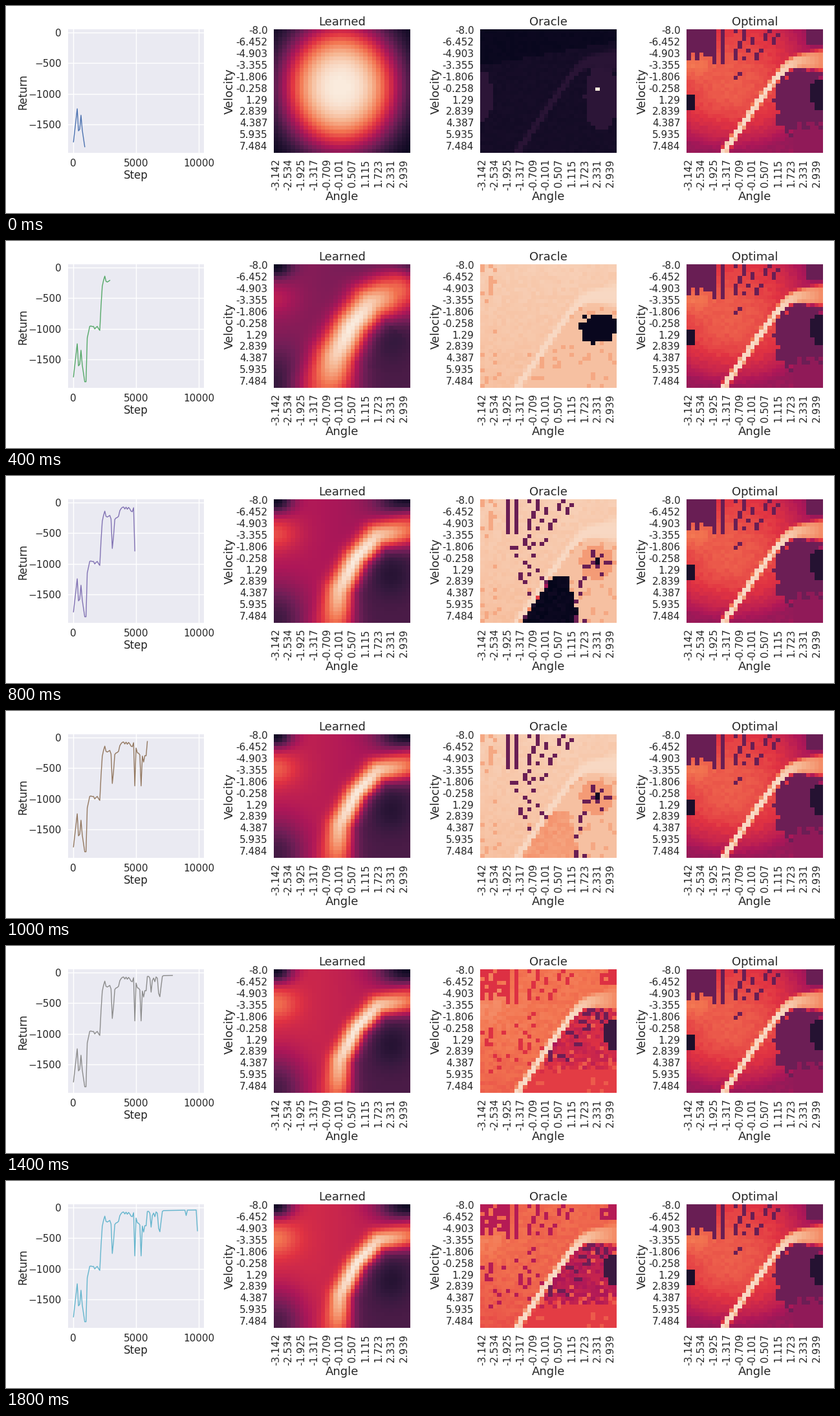
Recreate the animation shown at these times as a matplotlib script. Size 1280 by 320 pixels, loop 2000 ms.

```python
import numpy as np
import matplotlib.pyplot as plt
from matplotlib.animation import FuncAnimation
from matplotlib.colors import LinearSegmentedColormap

W, H, N, RUNS = 1280, 320, 32, 10
TOP, BOTTOM, PANEL_W = 35.8, 226.6, 210.6
INK = "#262626"
CYCLE = ["#4C72B0", "#DD8452", "#55A868", "#C44E52", "#8172B3",
         "#937860", "#DA8BC3", "#8C8C8C", "#CCB974", "#64B5CD"]
ROCKET = LinearSegmentedColormap.from_list("heat", [
    "#03051a", "#35193e", "#701f57", "#ad1759",
    "#e13342", "#f37651", "#f6b48f", "#faebdd"])
plt.rcParams["font.family"] = "DejaVu Sans"

rng = np.random.default_rng(4)
v, u = np.mgrid[0:N, 0:N].astype(float)
noise = rng.random((N, N))
grain = rng.random((N, N)) - 0.5


def training_returns():
    """Plateaus through key points, with jitter and a few collapses."""
    i = np.arange(10 * RUNS)
    keys = [(0, -1785), (3, -1245), (4, -1605), (5, -1580), (6, -1350),
            (7, -1590), (9, -1865), (10, -1865), (11, -1150), (13, -960),
            (21, -1000), (23, -310), (25, -120), (26, -260), (36, -240),
            (37, -70), (49, -80), (51, -245), (58, -250), (59, -60),
            (70, -75), (72, -50), (99, -40)]
    level = np.interp(i, *zip(*keys))
    jitter = rng.uniform(-1, 1, i.size)
    level += np.where((i > 13) & (i < 37), 45 * jitter, 0)
    level -= np.where((i >= 37) & (i < 70), 90 * jitter ** 2, 0)
    for step, value in [(31, -750), (32, -550), (49, -790), (54, -790),
                        (56, -400), (62, -320), (68, -340), (69, -395),
                        (70, -220), (90, -130), (99, -380)]:
        level[step] = value
    return level


def bump(col, row, rx, ry):
    return np.exp(-((u - col) / rx) ** 2 - ((v - row) / ry) ** 2)


def inside(col, row, rx, ry, rough=0.0):
    return np.hypot((u - col) / rx, (v - row) / ry) + rough * grain < 1


def nearest(cols, rows):
    """Distance to a path and the index of its closest point."""
    dist = np.hypot(u[..., None] - cols, v[..., None] - rows)
    return dist.min(axis=2), dist.argmin(axis=2)


def learned(run):
    """A blob that narrows into a bent crest between warm and cold sides."""
    if run == 0:
        return np.exp(-np.hypot((u - 15.2) / 13.8, (v - 14.4) / 16.8) ** 2.9)
    bend = 1 - .4 ** (run - 1)
    first = np.array([(9, 31), (12.5, 24), (16, 16.5), (19.5, 10.5), (23, 5)])
    last = np.array([(14.3, 31), (15, 23), (19, 14.5), (24, 8.7), (31.5, 7.5)])
    keys = first + (last - first) * bend
    t = np.linspace(0, 1, 200)
    cols, rows = (np.interp(t, np.linspace(0, 1, 5), axis) for axis in keys.T)
    dist, k = nearest(cols, rows)

    below = v > np.interp(u, cols, rows)
    side = np.where(below, dist, -dist)
    warm = .28 + .3 * (1 - .7 ** (run - 1)) - .004 * u
    warm += .16 * bend * bump(0, 8.5, 5, 4)
    cold = .2 - .1 * bend * bump(27, 19, 5, 6)
    z = cold + (warm - cold) / (1 + np.exp((side - 2.5) / 1.3))
    z -= .9 * z * (bump(0, 0, 4, 3) + bump(31, 0, 7, 3.5))
    z -= .65 * z * bump(0, 31, 7, 10)

    value = 1 - .3 * np.abs(2 * t - 1) ** 2
    width = (2.1 + 4.2 * .55 ** (run - 1)) * (1 + .5 * (2 * t - 1) ** 2)
    return z + (value[k] - z) * np.exp(-(dist / width[k]) ** 2)


# Shared landmarks of the Oracle and Optimal panels
def crest_row(col):
    return 7.5 + 2.2 * np.log1p(np.exp((23.3 - col) / 1.4))


CREST_U = np.linspace(8.3, 31.5, 200)
tail = np.maximum(CREST_U - 21, 0)
crest_dist, crest_k = nearest(CREST_U, crest_row(CREST_U))
crest_value = (.96 - .019 * tail)[crest_k]
crest_mask = np.exp(-(crest_dist / (.8 + .2 * tail)[crest_k]) ** 6)
lower = (u > 8) & (v > crest_row(u) + .8)
near_crest = lower & (crest_dist < 6)
leaning = (u + .4 * v - 13) % 2.6 < .9
streaks = leaning & (u > 10) & (u + v < 24) & (noise < .8)
streaks |= ((u == 6) | (u == 8)) & (v < 9)
corners = ((u < 6.5) & (v < 4.5 + 3 * noise)) | ((u > 27.5) & (v < 4))
dark_edge = inside(31, 16.5, 2.6, 4, .3)
hole = np.hypot(u - 27.2, v - 16.2) + 1.6 * grain < 4
hole |= (u > 27) & (abs(v - 15.5) < 1.6)


def with_crest(z, value=crest_value):
    return z + (value - z) * crest_mask


def optimal():
    fall = np.where(v > 14, .0009, .0004) * (v - 14) ** 2
    z = np.maximum(.66 - .0006 * (u - 10) ** 2 - fall, .38)
    z += .12 * bump(0, 8, 5, 4) + .03 * grain
    z[streaks | corners] = .27
    z[inside(27, 18.5, 7, 9.5, .3) & lower] = .28
    z[lower & (u > 24) & (v > 23 + 3 * noise)] = .36
    z[dark_edge] = .1
    z[(u < 1 + noise) & (abs(v - 18.5) < 1.6)] = .07
    return with_crest(z)


def early():
    z = .055 - .03 * (v < 9 - .2 * u) + .012 * grain
    z[inside(28, 17, 4, 8.5, .1) | inside(0, 17, 2.6, 6.5, .1)] = .12
    z = with_crest(z, .11)
    z[15, 27] = 1
    return z


def striped():
    z = .51 + .03 * np.sin(.9 * (u + .35 * v)) + .02 * grain
    stripe = np.sin(.9 * (1.5 * u + v)) + 2.2 * grain
    left = (v > 8 + .95 * u) & (u < 11)
    right = (u > 13) & (v > 18 + .2 * abs(u - 16))
    wedge = abs(u - 10.5 - .25 * (31 - v)) < 1.8
    z[(left | right) & ~wedge & (stripe > -.3)] = .03
    z[inside(27.5, 16, 6.6, 5.8, .15)] = .02
    z[16, 19] = .98
    return z


def peach(cone=None, marks=False):
    z = .92 - .001 * v + .02 * grain
    z[lower] = .89
    z[(noise > .88) & ((v > 22) | (u < 4) | lower)] = .83
    if cone is not None:
        wedge = lower & (v > 19) & (u < 20.3 + .27 * (v - 21))
        z[wedge] = cone + .04 * grain[wedge]
    z = with_crest(z, .95)
    if marks:
        z[inside(27, 16, 4, 4.5, .2)] = .8
        dots = (noise < .13) & (abs(v - 16) < 10) & (abs(u - 11) < 5) & ~lower
        ring = (noise > .7) & inside(27, 16, 3.5, 3.5)
        fringe = (noise < .25) & (abs(u - 22.5) < 2) & (v > 19)
        z[streaks | dots | ring | fringe] = .27
        z[15:17, 27] = .04
    else:
        z[hole] = .02
    return z


def fiery(base, mark, under):
    z = base + .05 * bump(0, 8, 8, 6) - .003 * np.maximum(v - 18, 0) + .04 * grain
    z[corners & (noise > .35)] = mark
    dashes = (noise < .16) & (abs(v - 20) < 7) & (u < 15)
    z[streaks | dashes] = mark
    z[lower] = under + .08 * grain[lower]
    z[near_crest & (noise < .25)] = .28
    z[lower & (v > 23 + 4 * noise)] = .59
    z[lower & (noise > .93)] = .66
    z[dark_edge] = .16
    return with_crest(z)


learned_fields = [learned(run) for run in range(RUNS)]
oracle_fields = [
    early(), striped(), peach(), peach(cone=.85),
    peach(cone=.02, marks=True), peach(cone=.8, marks=True), peach(cone=.77),
    fiery(.71, .56, .52), fiery(.7, .5, .5), fiery(.68, .45, .46)]
returns = training_returns()

# Stage
fig = plt.figure(figsize=(W / 100, H / 100), dpi=100, facecolor="white")


def panel(left):
    ax = fig.add_axes([left / W, 1 - BOTTOM / H, PANEL_W / W, (BOTTOM - TOP) / H])
    for spine in ax.spines.values():
        spine.set_visible(False)
    ax.tick_params(length=0, pad=7, labelsize=11, labelcolor=INK)
    return ax


def label(x, y, text, size, upright=False):
    fig.text(x / W, 1 - y / H, text, size=size, color=INK,
             rotation=90 if upright else 0, rotation_mode="anchor",
             ha="center", va="baseline")


def heatmap(left, title, field):
    ax = panel(left)
    image = ax.imshow(field, cmap=ROCKET, vmin=0, vmax=1,
                      aspect="auto", interpolation="nearest")
    ticks = range(0, N, 3)
    angles, speeds = np.linspace(-np.pi, np.pi, N), np.linspace(-8, 8, N)
    ax.set_xticks(ticks, [str(round(float(angles[i]), 3)) for i in ticks], rotation=90)
    ax.set_yticks(ticks, [str(round(float(speeds[i]), 3)) for i in ticks], va="center")
    middle = left + PANEL_W / 2
    label(middle, 30, title, 13)
    label(middle, 300, "Angle", 13)
    label(left - 63, 132, "Velocity", 13, upright=True)
    return image


chart = panel(95.6)
chart.set_facecolor("#EAEAF2")
chart.grid(color="white", linewidth=1)
chart.set_axisbelow(True)
chart.set(xlim=(-450, 10430), ylim=(-1960, 55),
          xticks=[0, 5000, 10000], yticks=[0, -500, -1000, -1500])
label(200.5, 267, "Step", 12)
label(31, 132, "Return", 12, upright=True)
curve, = chart.plot([], [], linewidth=1)

learned_image = heatmap(414.2, "Learned", learned_fields[0])
oracle_image = heatmap(733.2, "Oracle", oracle_fields[0])
heatmap(1052.2, "Optimal", optimal())


def update(run):
    count = 10 * (run + 1)
    curve.set_data(100 * np.arange(count), returns[:count])
    curve.set_color(CYCLE[run])
    learned_image.set_data(learned_fields[run])
    oracle_image.set_data(oracle_fields[run])
    return curve, learned_image, oracle_image


animation = FuncAnimation(fig, update, frames=RUNS, interval=200,
                          repeat=True, repeat_delay=0)
plt.show()
```
